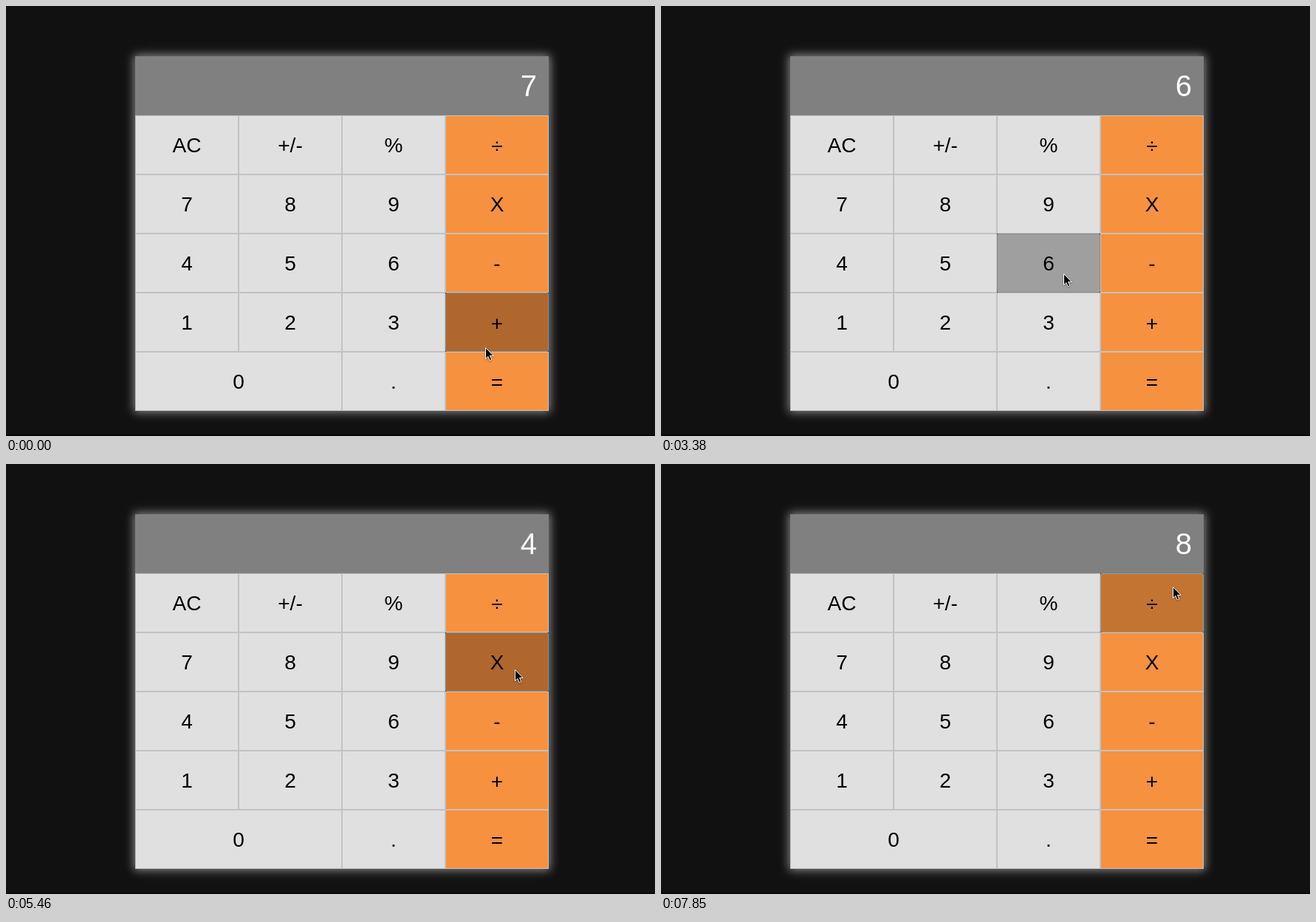
Write an HTML page that moves like this. It is 879 px wide and 582 px high and loops after 8 s.

```html
<!DOCTYPE html>
<html lang="en">
<head>
<meta charset="utf-8">
<title>Calculator</title>
<style>
  html, body { margin: 0; width: 100%; height: 100%; overflow: hidden; background: #111; }
  body { position: relative; font: 28px "Liberation Sans", Arial, sans-serif; color: #000; }
  body::after { content: ""; position: absolute; left: 0; right: 0; top: 580px; height: 2px; background: #080808; }
  #calc {
    position: absolute; left: 175px; top: 68px; width: 560px; height: 480px;
    display: grid; grid-template: repeat(6, 80px) / repeat(4, 140px);
    background: #111; box-shadow: 0 0 12px 2px #888;
  }
  #display {
    grid-column: 1 / -1; padding-right: 16px;
    background: #808080; color: #fff; font-size: 40px; line-height: 80px; text-align: right;
  }
  .key {
    box-sizing: border-box; height: 80px; border: 1px solid #c2c2c2; background: #e0e0e0;
    line-height: 80px; text-align: center;
  }
  .op { background: #f6913f; }
  .low { line-height: 82px; }
  .wide { grid-column: span 2; }
  .hover { border-radius: 2px; }
  #cursor { position: absolute; left: 0; top: 0; overflow: visible; filter: drop-shadow(0 1px 1px #0006); }
</style>
</head>
<body>
<div id="calc"><div id="display"></div></div>
<svg id="cursor" width="14" height="20">
  <path d="M.5 .5V15.6L3.9 12.4L6.2 17.8L8.8 16.7L6.5 11.4H11.2Z" fill="#000" stroke="#fff"/>
</svg>
<script>
const LOOP = 8000, TICK = 147, FADE = 150, DARK = 0.29;
const calc = document.getElementById('calc');
const display = document.getElementById('display');
const cursor = document.getElementById('cursor');

// Four columns per row; the wide zero takes two cells.
const labels = 'AC +/- % ÷ 7 8 9 X 4 5 6 - 1 2 3 + 0 0 . ='.split(' ');
const keys = {};
for (const label of new Set(labels)) {
  const key = keys[label] = document.createElement('div');
  key.className = 'key' + ('÷X-+='.includes(label) ? ' op' : '') +
    ('÷+='.includes(label) ? ' low' : '') + (label === '0' ? ' wide' : '');
  key.textContent = label;
  calc.append(key);
}

// Each move: start, duration, destination x and y, value shown from the start.
const moves = [
  [-1000, 1, 649, 462, 7],
  [0, 140, 669, 431, 7],
  [440, 150, 520, 428, 0],
  [1010, 270, 680, 499, 3],
  [1890, 290, 678, 376, 10],
  [2630, 350, 545, 362, 0],
  [3380, 440, 692, 562, 6],
  [3960, 147, 694, 548, 6],
  [4110, 147, 691, 520, 6],
  [4560, 750, 689, 278, 4],
  [5760, 450, 360, 430, 0],
  [6660, 147, 569, 452, 2],
  [6810, 220, 668, 508, 2],
  [7550, 210, 693, 166, 8]
];
const moveAt = t => moves.findLastIndex(([start]) => start <= t);

function pointerAt(t) {
  const i = moveAt(t);
  const [start, duration, x, y] = moves[i];
  const [, , fromX, fromY] = moves[i - 1] || moves[i];
  const u = Math.min(1, (t - start) / duration) ** 4;
  return [fromX + (x - fromX) * u, fromY + (y - fromY) * u];
}

function keyAt(t) {
  const [x, y] = pointerAt(t);
  return labels[(Math.floor((y - 68) / 80) - 1) * 4 + Math.floor((x - 175) / 140)];
}

// Replays the recent hovers, so that every key darkens and recovers gradually.
function shadesAt(t) {
  const dt = 5, shades = {};
  for (let s = t - 600; s <= t; s += dt) {
    const hovered = keyAt(Math.max(0, s));
    for (const label in keys) {
      const change = label === hovered ? dt / FADE : -dt / FADE;
      shades[label] = Math.min(1, Math.max(0, (shades[label] || 0) + change));
    }
  }
  return shades;
}

function draw(now) {
  const t = now % LOOP;
  const [start, , , , value] = moves[moveAt(t)];
  const step = start + TICK * Math.floor((t - start) / TICK + 0.1);
  const [x, y] = pointerAt(step);
  const hovered = keyAt(step), shades = shadesAt(step);
  display.textContent = value;
  cursor.style.transform = `translate(${Math.round(x)}px, ${Math.round(y)}px)`;
  for (const label in keys) {
    const s = shades[label], dark = s * s * (3 - 2 * s);
    keys[label].style.filter = dark > 0.002 ? `brightness(${1 - DARK * dark})` : '';
    keys[label].classList.toggle('hover', label === hovered);
  }
  requestAnimationFrame(() => draw(performance.now() - began));
}

const began = performance.now();
draw(0);
</script>
</body>
</html>
```
